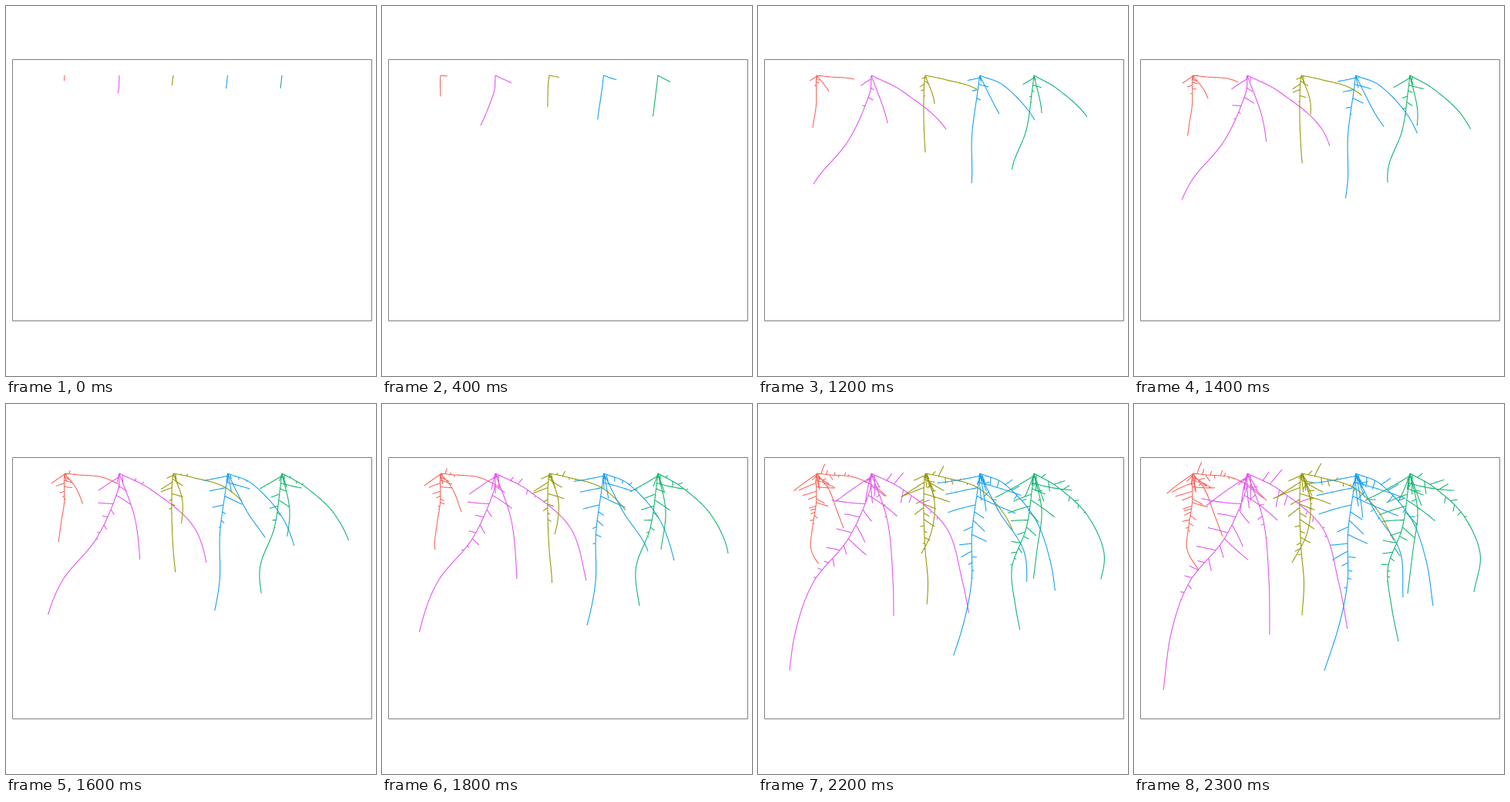
Write an HTML page with a canvas that moves like this. It is 480 px wide and 480 px high and loops after 2400 ms.

```html
<!DOCTYPE html>
<html lang="en">
<head>
<meta charset="utf-8">
<title>Root growth</title>
<style>
html, body { margin: 0; width: 100%; height: 100%; overflow: hidden; background: #fff; }
canvas { display: block; width: 480px; height: 480px; }
</style>
</head>
<body>
<canvas id="stage"></canvas>
<script>
const LOOP = 2400, STEP = 200, LAST = 12;
const KEY_GAP = 3;   // steps between key points of an axis
const LAG = 4.8;     // steps until a piece of axis grows a side root
const TOP = 90;

// Each plant: a tap root and two basal roots, as key points that end at the last step.
const plants = [
  { color: '#F4685F', x: 76, rate: 5.5,
    tap: [[75.5, 97], [75.5, 128], [71, 158], [69, 189], [84, 216]],
    wide: [[94, 92], [125, 95], [154, 109], [172, 125]],
    steep: [[92, 111], [103, 140], [115, 172]] },
  { color: '#E056EE', x: 147, rate: 10,
    tap: [[145, 113], [117, 175], [72, 231], [48.5, 296], [38, 371]],
    wide: [[188, 111], [244, 160], [265, 229], [277, 292]],
    steep: [[168, 152], [175, 227], [176, 299]] },
  { color: '#97990A', x: 217, rate: 7,
    tap: [[215.5, 103], [215, 145], [217, 190], [220.5, 232], [218, 274]],
    wide: [[243, 95.5], [284, 108], [316, 138], [337, 177]],
    steep: [[229, 127], [224, 169], [205, 206]] },
  { color: '#1A9FF0', x: 287.5, rate: 10,
    tap: [[285.5, 107], [277.5, 168], [277, 230], [266, 287], [247, 346]],
    wide: [[320, 104], [359, 148], [379, 203], [388, 262]],
    steep: [[313, 140], [345, 191], [349, 251]] },
  { color: '#14B46E', x: 358, rate: 8.5,
    tap: [[356, 107], [348, 161], [329.5, 212], [334, 262], [343, 308]],
    wide: [[389, 108], [427, 144], [449, 194], [441, 244]],
    steep: [[368, 139], [362, 189], [355, 246]] }
];

let seed = 7;
function random(lo, hi) {
  seed = (seed * 16807) % 2147483647;
  return lo + (hi - lo) * seed / 2147483647;
}

// Main root: a cubic through its key points, with slopes taken over time
function axis(x, start, tail) {
  const pts = [[x, TOP], ...tail];
  const n = pts.length - 1;
  const times = pts.map((_, i) => i ? LAST - KEY_GAP * (n - i) : start);
  const slope = (i, c) => {
    const a = Math.max(0, i - 1), b = Math.min(n, i + 1);
    return (pts[b][c] - pts[a][c]) / (times[b] - times[a]);
  };
  const at = step => {
    let i = 0;
    while (i < n - 1 && step > times[i + 1]) i++;
    const span = times[i + 1] - times[i];
    const f = (step - times[i]) / span, g = 1 - f;
    return [0, 1].map(c =>
      g * g * ((1 + 2 * f) * pts[i][c] + f * span * slope(i, c)) +
      f * f * ((3 - 2 * f) * pts[i + 1][c] - g * span * slope(i + 1, c)));
  };
  return { start, at };
}

// Minor root: steady growth along a gently turning heading
function minor([x, y], start, heading, rate) {
  const curl = random(-0.02, 0.02);
  const at = step => {
    const age = step - start, angle = heading + curl * age;
    return [x + rate * age * Math.cos(angle), y + rate * age * Math.sin(angle)];
  };
  return { start, at };
}

function sideRoots(parent, rate, spacing) {
  const roots = [];
  let side = 1;
  for (let born = parent.start + 0.2; born + LAG < LAST; born += spacing * random(0.7, 1.3)) {
    const [x, y] = parent.at(born), [nx, ny] = parent.at(born + 0.1);
    const heading = Math.atan2(ny - y, nx - x) + side * random(0.9, 1.45);
    roots.push(minor([x, y], born + LAG, heading, rate * random(0.3, 1)));
    if (random(0, 1) < 0.75) side = -side;
  }
  return roots;
}

function grow({ x, rate, tap, wide, steep }) {
  const main = axis(x, -1, tap), right = axis(x, 1, wide), down = axis(x, 3, steep);
  const roots = [main, right, down,
    ...sideRoots(main, rate, 0.45),
    ...sideRoots(right, rate * 0.6, 0.6),
    ...sideRoots(down, rate * 0.6, 0.6)];
  for (let start = 5; start < LAST - 1; start += 1.5) {
    roots.push(minor([x, TOP], start, random(0.9, 1.9), rate * random(0.6, 0.9)));
  }
  return roots;
}

for (const plant of plants) plant.roots = grow(plant);

const canvas = document.getElementById('stage');
const ctx = canvas.getContext('2d');
const ratio = window.devicePixelRatio || 1;
canvas.width = canvas.height = 480 * ratio;
ctx.scale(ratio, ratio);

function trace({ start, at }, step) {
  if (step <= start) return;
  ctx.moveTo(...at(start));
  for (let s = start + 0.2; s < step; s += 0.2) ctx.lineTo(...at(s));
  ctx.lineTo(...at(step));
}

function draw(step) {
  ctx.fillStyle = '#fff';
  ctx.fillRect(0, 0, 480, 480);
  ctx.lineWidth = 1.1;
  ctx.lineJoin = 'round';
  for (const { color, roots } of plants) {
    ctx.strokeStyle = color;
    ctx.beginPath();
    roots.forEach(root => trace(root, step));
    ctx.stroke();
  }
  ctx.lineWidth = 1;
  ctx.strokeStyle = '#7f7f7f';
  ctx.strokeRect(8.5, 69.5, 466, 339);
}

function tick() {
  const t = performance.now() % LOOP;
  draw(t >= LOOP - STEP / 2 ? LAST : Math.floor(t / STEP));
  requestAnimationFrame(tick);
}
tick();
</script>
</body>
</html>
```
